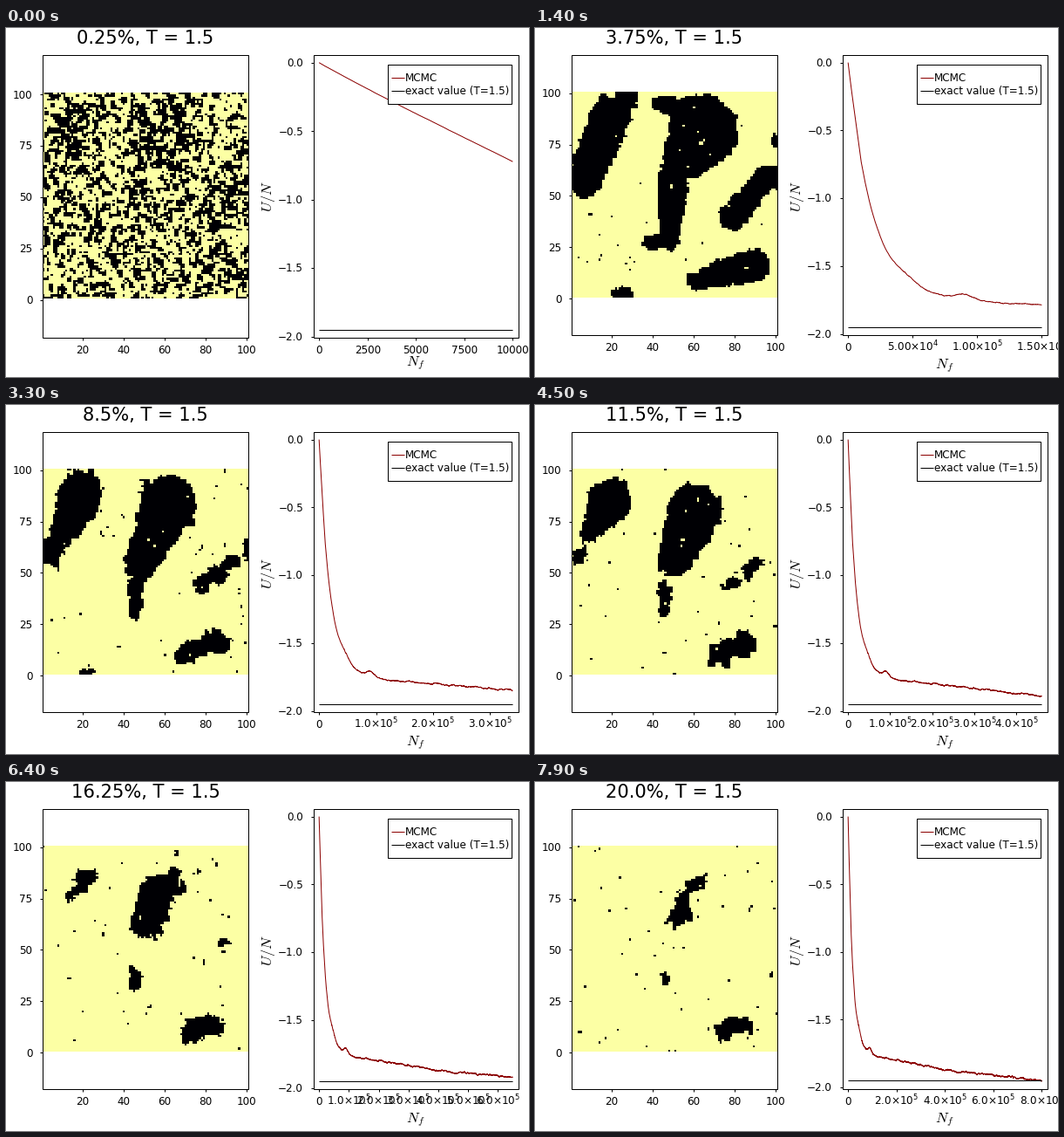
These frames come from a looping animation (600 px wide and 400 px high, 8 s). A matplotlib script:

```python
import math
import random

import matplotlib.pyplot as plt
import numpy as np
from matplotlib.animation import FuncAnimation
from matplotlib.colors import ListedColormap
from matplotlib.patches import Rectangle

FRAMES, SIZE, TEMP = 80, 100, 1.5
EXACT = -1.9509
LEFT, RIGHT, TOP = (42, 277.5), (352.5, 588), 30.5
CMAP = ListedColormap(["#000004", "#fcffa4"])

plt.rcParams["font.family"] = "DejaVu Sans"

# ---- black domains: tapered strokes in lattice units at a few times ----
gx, gy = (g.ravel() for g in np.meshgrid(*[np.arange(1.0, SIZE + 1)] * 2))


def stroke(x0, y0, r0, x1, y1, r1):
    """Signed distance to a stroke, positive inside."""
    dx, dy = x1 - x0, y1 - y0
    t = np.clip(((gx - x0) * dx + (gy - y0) * dy) / (dx * dx + dy * dy), 0, 1)
    return r0 + (r1 - r0) * t - np.hypot(gx - x0 - t * dx, gy - y0 - t * dy)


times, fields = [], []


def key(time, *strokes):
    times.append(time)
    fields.append(np.max(strokes, 0) if strokes else np.full(gx.size, -5.0))


key(14,
    stroke(23, 97, 9.5, 7, 58, 9),
    stroke(64, 81, 18, 52, 62, 9),
    stroke(50, 58, 8, 48, 28, 4.5),
    stroke(38, 27, 3.5, 46, 29, 3),
    stroke(43, 95, 4, 62, 91, 7),
    stroke(95, 59, 6, 79, 40, 7),
    stroke(61, 9, 5, 89, 16, 8),
    stroke(16, -1, 4, 25, 0, 6),
    stroke(100, 78, 3, 101, 75, 3))
key(24,
    stroke(19, 94, 10, 5, 57, 6),
    stroke(60, 85, 14, 51, 60, 9),
    stroke(49, 58, 8, 44, 30, 3),
    stroke(80, 48, 4, 98, 57, 5),
    stroke(68, 8, 4, 83, 18, 7),
    stroke(19, 0, 2, 23, 0, 3))
key(33,
    stroke(19, 85, 12.5, 9, 66, 5),
    stroke(-1, 63, 4, 4, 58, 2),
    stroke(62, 84, 13, 48, 54, 8),
    stroke(98, 65, 2, 101, 65, 3))
key(45,
    stroke(18, 83, 11, 9, 70, 4),
    stroke(60, 78, 14, 52, 58, 9))
key(64,
    stroke(14, 76, 2, 17, 79, 2),
    stroke(55, 77, 8, 49, 63, 6))
key(79)


def shape_at(k):
    if k <= times[0]:
        return fields[0]
    i = max(j for j in range(len(times) - 1) if times[j] <= k)
    w = (k - times[i]) / (times[i + 1] - times[i])
    return (1 - w) * fields[i] + w * fields[i + 1]


def simulate():
    """Single-flip Metropolis, one sweep per frame, steered near domain walls."""
    rng = random.Random(4)
    n = SIZE * SIZE
    spin = [-1 if rng.random() < 0.46 + 0.05 * math.tanh(d / 4) else 1
            for d in fields[0]]
    near = [(r * SIZE + (c + 1) % SIZE, r * SIZE + (c - 1) % SIZE,
             (r + 1) % SIZE * SIZE + c, (r - 1) % SIZE * SIZE + c)
            for r in range(SIZE) for c in range(SIZE)]
    out = []
    for k in range(FRAMES):
        d = shape_at(k)
        reach = 4 + 30 * math.exp(-k / 6)
        pull = 0.15 + 1.05 * min(1, k / 7)
        h = (-pull * np.tanh(d) * np.exp(-(d / reach) ** 2)).tolist()
        for _ in range(n):
            i = int(rng.random() * n)
            a, b, c, e = near[i]
            cost = 2 * spin[i] * (spin[a] + spin[b] + spin[c] + spin[e] + h[i])
            if cost <= 0 or rng.random() < math.exp(-cost / TEMP):
                spin[i] = -spin[i]
        out.append(np.array(spin).reshape(SIZE, SIZE))
    return out


# ---- energy per site, time in units of 10^4 flips ----
PER = 100


def bump(t, mid, width):
    return np.exp(-((t - mid) / width) ** 2)


def energy_curve():
    t = np.arange(FRAMES * PER + 1) / PER
    drop = 1.7 * (1 - np.exp(-t / 1.85)) + 0.01225 * t ** 0.693
    drop -= 0.15 * t * np.maximum(0, 1 - t)
    drop += 0.015 * bump(t, 42, 14) - 0.033 * (bump(t, 4.6, 1.1) + bump(t, 8.9, 0.9))
    kicks = np.random.default_rng(2).normal(0, 0.0007, t.size)
    wobble = np.zeros(t.size)
    for i in range(1, t.size):
        wobble[i] = 0.985 * wobble[i - 1] + kicks[i]
    return t, wobble * np.minimum(1, 0.4 + t / 10) - drop


flips, energy = energy_curve()
lattice = simulate()


# ---- axis ticks ----
def tick_step(top):
    """Step with the best mix of count, coverage and roundness."""
    best = (-1, 0)
    mag = 10 ** math.floor(math.log10(top))
    for unit in (mag / 10, mag):
        for q, nice in ((1, 1), (5, .9), (2.5, .5), (2, .7), (3, .2)):
            step = q * unit
            n = int(1.03 * top / step + 1e-9) + 1
            if 4 <= n <= 8:
                score = ((1 - abs(n - 5) / 5) / 4 + nice / 4
                         + 0.5 * 1.06 * top / ((n - 1) * step))
                if score > best[0] + 1e-9:
                    best = (score, step)
    return best[1]


def x_ticks(top):
    step = tick_step(top)
    vals = [i * step for i in range(int(1.03 * top / step + 1e-9) + 1)]
    if vals[-1] <= 10000:
        return [(v, f"{v:.0f}") for v in vals]
    parts = [(v, math.floor(math.log10(v) + 1e-9)) for v in vals[1:]]
    mants = [v / 10 ** e for v, e in parts]
    digits = next(d for d in range(4)
                  if all(abs(round(m, d) - m) < 1e-9 for m in mants)) + 1
    return [(0, "0")] + [(v, rf"${m:.{digits}f}{{\times}}10^{{{e}}}$")
                         for (v, e), m in zip(parts, mants)]


# ---- drawing, in pixels from the top left ----
fig = plt.figure(figsize=(6, 4), dpi=100, facecolor="white")
ax = fig.add_axes([0, 0, 1, 1])


def line(x, y, color="black", z=3):
    ax.plot(x, y, color=color, lw=0.72, zorder=z, solid_capstyle="butt")


def label(x, y, s, px=12, ha="center", va="baseline", math_font="dejavusans", **kw):
    ax.text(x, y, s, fontsize=px * 0.72, ha=ha, va=va, zorder=6,
            math_fontfamily=math_font, **kw)


def box(x0, x1, y0, y1, fill="none", z=4):
    ax.add_patch(Rectangle((x0, y0), x1 - x0, y1 - y0, fc=fill, ec="black",
                           lw=0.72, zorder=z))


def x_tick(x, bottom, s):
    line([x, x], [bottom, bottom + 3])
    label(x, bottom + 18.4, s)


def y_tick(left, y, s):
    line([left - 3, left], [y, y])
    label(left - 11.5, y + 4.4, s, ha="right")


def draw_lattice(k, bottom):
    x0, x1 = LEFT
    cell = (x1 - x0) / SIZE
    mid = (TOP + bottom) / 2
    half = SIZE / 2 * cell
    ax.imshow(lattice[k], cmap=CMAP, vmin=-1, vmax=1, origin="lower", aspect="auto",
              interpolation="nearest", extent=(x0, x1, mid + half, mid - half), zorder=1)
    box(x0, x1, TOP, bottom)
    for v in range(20, 101, 20):
        x_tick(x0 + (v - 0.5) * cell, bottom, str(v))
    for v in range(0, 101, 25):
        y_tick(x0, mid + (50.5 - v) * cell, str(v))
    label(160, 18.5, f"{(k + 1) * 0.25}%, T = {TEMP}", 21)


def draw_energy(k, bottom):
    x0, x1 = RIGHT
    n = (k + 1) * PER + 1
    top = (k + 1) * 10000
    u = energy[:n]
    high, low = u.max(), min(u.min(), EXACT)
    per_unit = (bottom - TOP) / (1.06 * (high - low))

    def to_x(v):
        return x0 + (v / top + 0.03) / 1.06 * (x1 - x0)

    def to_y(v):
        return TOP + (high - v) * per_unit + 0.03 / 1.06 * (bottom - TOP)

    line(to_x(flips[:n] * 10000), to_y(u), "darkred", 2)
    line([to_x(0), to_x(top)], [to_y(EXACT)] * 2)
    box(x0, x1, TOP, bottom)
    for v, s in x_ticks(top):
        x_tick(to_x(v), bottom, s)
    for i in range(5):
        y_tick(x0, to_y(-i / 2), ("\u2212" if i else "") + f"{i / 2:.1f}")

    box(438, 580, 41.5, 87, "white", 5)
    for y, color, s in ((57, "darkred", "MCMC"), (72, "black", "exact value (T=1.5)")):
        line([442, 456.5], [y, y], color, 6)
        label(458, y + 4.4, s, ha="left")
    label(459, 390 if k else 387.5, "$N_f$", 16.5, ha="left", math_font="cm")
    label(301, 193, "$U/N$", 16.5, va="center", math_font="cm", rotation=90)


def draw(k):
    ax.clear()
    ax.set_axis_off()
    # power labels are taller, so the panels shrink once they appear
    bottom = 352 if k else 355
    draw_lattice(k, bottom)
    draw_energy(k, bottom)
    ax.set_xlim(0, 600)
    ax.set_ylim(400, 0)
    return []


anim = FuncAnimation(fig, draw, frames=FRAMES, interval=100, repeat=True,
                     repeat_delay=0, init_func=lambda: [])
plt.show()
```
